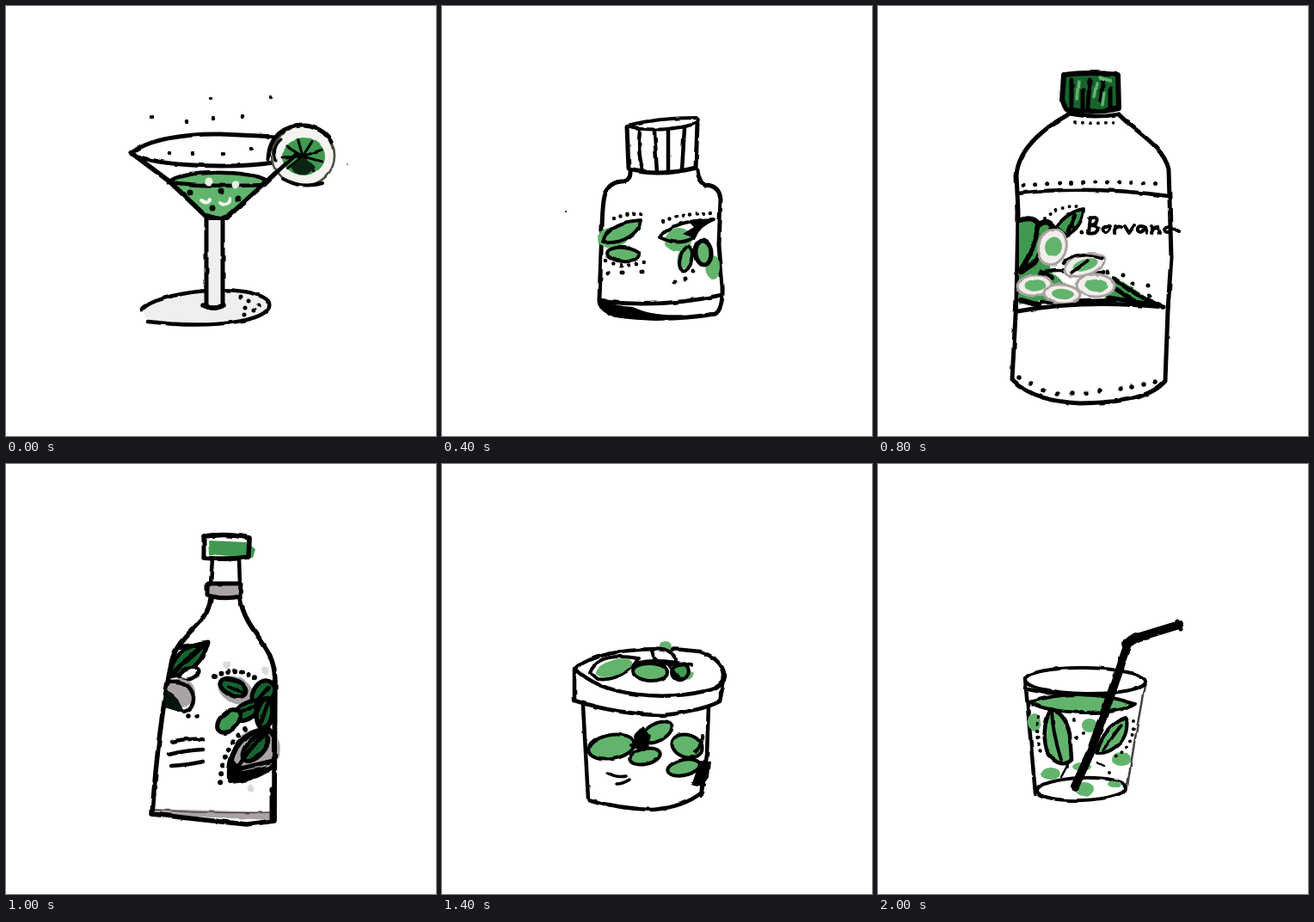
Write an HTML page that moves like this. It is 500x500 px and loops after 2.2 s.

```html
<!DOCTYPE html>
<html lang="en">
<head>
<meta charset="utf-8">
<title>Green sketches</title>
<style>
html, body { margin: 0; width: 100%; height: 100%; overflow: hidden; background: #fff; }
svg { display: block; width: 100vw; height: 100vh; }
svg > g { opacity: 0; stroke-linecap: round; stroke-linejoin: round; }
</style>
</head>
<body>
<svg id="stage" viewBox="0 0 500 500">
  <filter id="ink" filterUnits="userSpaceOnUse" x="0" y="0" width="500" height="500" color-interpolation-filters="sRGB">
    <feTurbulence type="fractalNoise" baseFrequency=".06" numOctaves="2" seed="4"/>
    <feDisplacementMap in="SourceGraphic" scale="3" xChannelSelector="R" yChannelSelector="G"/>
  </filter>
</svg>
<script>
const HOLD = 200;
const GREEN = '#62b46d', MID = '#3f9a50', DARK = '#17642f', PALE = '#efeff0', GREY = '#aaa3a5';

const line = (d, w = 4.5, fill = 'none', ink = '#000') =>
  `<path d="${d}" fill="${fill}" stroke="${ink}" stroke-width="${w}"/>`;
const wash = (d, fill = GREEN) => `<path d="${d}" fill="${fill}"/>`;
const oval = (x, y, rx, ry, turn = 0, fill = GREEN, w = 4, ink = '#000') =>
  `<ellipse rx="${rx}" ry="${ry}" transform="translate(${x} ${y}) rotate(${turn})" fill="${fill}" stroke="${ink}" stroke-width="${w}"/>`;
const blob = (x, y, rx, ry, turn = 0, fill = GREEN) => oval(x, y, rx, ry, turn, fill, 0);
const dots = (points, w = 5, ink = '#000') =>
  line(points.split(' ').map(p => `M${p}h.01`).join(''), w, 'none', ink);
const dotRow = (d, gap = 9, w = 4.5) =>
  `<path d="${d}" fill="none" stroke="#000" stroke-width="${w}" stroke-dasharray="0 ${gap}"/>`;

const limeSlice = () => {
  let spokes = '';
  for (let i = 0; i < 9; i++) {
    const a = i * Math.PI * 2 / 9 + .3;
    spokes += `M345 175l${(24 * Math.cos(a)).toFixed(1)} ${(20 * Math.sin(a)).toFixed(1)}`;
  }
  return oval(346, 174, 36, 35, 0, '#f3f3ef', 2.5, '#4c4a3c') +
    line('M305 178C306 150 325 138 348 139Q368 141 378 157', 5) +
    line('M322 201Q345 213 367 206', 4) +
    blob(346, 175, 25, 22, 0, MID) + line(spokes, 3) +
    wash('M345 175L331 188Q336 198 350 196L360 188Z', '#0a2412') +
    line('M314 180Q309 164 320 155', 3);
};

const cocktail = () =>
  line('M158 353C174 333 280 319 305 343C316 364 250 377 165 367', 4.5, PALE) +
  line('M233 246V349Q242 354 252 348V246', 5, PALE) +
  line('M229 348Q241 354 254 348', 5.5) +
  wash('M189 206C200 190 285 190 304 205L256 246H236Z') +
  line('M189 205C201 190 287 191 303 203M190 205Q240 211 301 208', 4.5) +
  line('M146 171C165 155 210 148 250 149L316 152M146 172C180 188 270 189 318 181', 5) +
  line('M146 171L190 204L234 246M335 174L301 206L257 246', 5.5) +
  wash('M226 239L236 249H258L269 237L249 245Z', '#000') +
  limeSlice() + line('M337 173L304 203', 4.5) +
  dots('169,129 210,134 238,107 240,131 275,128 307,107', 4.5) +
  dots('190,171 217,171 253,172 285,166', 4.5) +
  dots('214,217 250,215 270,224 240,235', 7) +
  dots('236,204 267,208', 9, '#e6f2e4') +
  line('M227 226q6 5 10 0M249 229q8 6 11 -5', 4, 'none', '#f4fbf3') +
  dots('273,338 282,343 294,348 278,351 288,354 277,359', 5) + dots('397,184', 1.5);

const cup = () =>
  line('M302 246C340 222 368 260 344 286C332 302 312 304 296 302', 5) +
  line('M148 228C160 204 294 204 306 228C292 252 164 252 148 228Z', 4, '#fff') +
  wash('M160 231C180 216 276 216 294 231C270 246 184 246 160 231Z') +
  line('M148 229C150 292 166 342 192 357Q226 369 260 357C288 342 304 292 306 229', 4.5) +
  oval(207, 296, 24, 12, -28) + oval(244, 301, 22, 11, 30) + oval(225, 327, 18, 9, -8, MID) +
  dotRow('M176 275Q222 259 278 275') + dots('208,194 225,178 246,191 263,172', 4.5);

const pillBottle = () =>
  line('M219 192Q220 204 207 204C187 207 187 225 186 258L183 341Q182 352 200 359Q254 368 318 358Q327 352 326 326L322 278L324 224Q322 209 307 208Q298 204 297 191', 5) +
  line('M215 140L217 190Q255 199 295 188L297 137', 5, '#fff') +
  line('M215 139Q250 130 296 130Q304 136 278 141Q240 147 215 139Z', 4, '#fff') +
  line('M230 146Q227 166 233 191M247 146L250 194M263 144V194M282 142L279 191', 4.5) +
  line('M183 343Q254 352 325 336', 4.5) +
  wash('M182 340Q200 349 222 350Q244 361 282 359L250 366L202 362Q184 355 182 340Z', '#000') +
  blob(199, 269, 19, 12, -12) + blob(215, 260, 17, 9, -20) + blob(211, 289, 18, 9) +
  blob(275, 272, 16, 14) + blob(315, 304, 9, 14) + blob(283, 292, 9, 14, 20) + blob(303, 287, 9, 12) +
  line('M187 275C192 256 212 250 231 249C229 265 211 277 187 275Z', 4) +
  oval(211, 289, 19, 8, 5, 'none') +
  line('M253 269C262 254 290 249 316 248Q298 255 293 269Q276 280 253 269Z', 4) +
  wash('M286 250L318 248L301 257L291 269L280 265L293 257Z', '#000') +
  oval(284, 294, 7, 15, 16, 'none') + oval(304, 287, 9, 14, -5, 'none', 5) +
  dotRow('M200 247Q215 241 234 242', 8) + dotRow('M257 250Q283 240 319 241', 8) +
  dotRow('M191 296Q210 306 235 298', 9) +
  dots('193,310 209,310 232,309 271,321 283,317 292,308', 5) + dots('144,239', 2);

const tub = () =>
  line('M155 261L166 390Q184 408 250 411Q315 408 334 390L346 261') +
  line('M142 226V258Q180 283 250 283Q322 281 358 258V226', 4.5, '#fff') +
  line('M142 226C162 193 338 193 358 226C338 257 162 257 142 226Z', 4, '#fff') +
  oval(220, 225, 28, 10, -12) + oval(273, 226, 24, 9, 14) +
  oval(208, 327, 29, 14, -24) + oval(252, 343, 27, 13, 26, MID) + oval(286, 318, 24, 12, -26) +
  dotRow('M181 299Q250 311 323 296') + dotRow('M184 382Q250 394 317 381');

// Handwritten label word
const script =
  line('M247 246L245 264M246 247Q257 244 254 251Q252 255 246 255Q258 255 255 261Q252 266 245 264', 4) +
  line('M267 256Q259 255 261 261Q265 266 269 259Q270 255 267 256M275 256V264M275 260Q278 255 283 257', 4) +
  line('M287 256L292 264L298 255M310 257Q301 254 302 261Q305 266 310 257L312 264', 4) +
  line('M318 256V264Q319 256 326 257L328 264M338 256Q331 257 334 262Q339 265 341 259Q341 255 338 256L350 262', 4);

const petal = (x, y, rx, ry, turn) =>
  oval(x, y, rx, ry, turn, '#f1eeec', 3, '#aaa29f') + blob(x + 1, y, rx * .62, ry * .55, turn);

const largeBottle = () =>
  line('M220 127C200 138 163 163 161 197L163 240L161 340L156 434C176 455 204 460 235 462C276 461 315 458 334 436L337 354L341 292L338 190C332 162 296 144 280 126', 5) +
  line('M216 80Q247 76 279 80L280 119Q249 126 219 120L214 110Z', 6, DARK) +
  line('M225 86V116M238 98V118M246 86L244 118M262 84L259 110M270 96V117', 5) +
  line('M233 88L231 108M254 90L251 106M263 101L261 114M258 83L270 87', 3.5, 'none', GREEN) +
  line('M221 125Q250 131 280 126', 4.5) + dotRow('M229 135Q255 138 282 134', 9, 4) +
  line('M162 218Q243 208 338 221', 4.5) + dotRow('M169 209Q240 202 335 207', 14, 5) +
  wash('M164 247Q176 244 188 255L203 252L200 308L232 337L164 347Z', MID) +
  line('M165 249Q181 244 187 254Q181 286 166 307M187 255Q195 247 203 255L185 295M167 309L184 297M190 309L202 316M166 342L187 348', 6) +
  line('M207 257Q221 239 239 236Q238 257 219 267Z', 4, MID) + line('M229 243L221 262', 5) +
  wash('M262 343L275 314Q300 331 332 350Z', MID) +
  line('M274 317Q298 336 331 350M268 339L318 347M276 329L300 344', 5) +
  line('M216 299Q241 285 261 294M188 311Q204 305 219 308M224 313L262 310M190 345L276 342', 4.5) +
  petal(203, 280, 16, 21, 14) + petal(240, 301, 24, 12, -17) + petal(253, 325, 22, 13, 2) +
  petal(182, 325, 20, 12, -5) + petal(214, 335, 21, 11, 5) +
  line('M217 296Q240 285 260 293M225 310L244 296', 3.5) +
  line('M162 355Q240 341 332 350', 5) +
  dotRow('M194 247Q216 229 236 234', 8, 4) +
  dots('228,258 237,263 267,310 285,313 296,323 314,325 315,337', 5) + script +
  dots('164,432 178,438 192,447 209,451 225,450 242,450 258,448 282,445 295,443 310,440 323,437', 5.5);

const spiritBottle = () =>
  wash('M173 401L310 405V414L171 408Z', GREY) +
  line('M173 402Q234 407 309 405', 1.5, 'none', '#4e464b') +
  line('M240 111L238 139M271 111L272 139', 4.5) +
  line('M238 157C234 187 201 197 193 228C183 275 175 336 170 407Q230 414 280 419L312 415L313 252C312 207 281 200 272 157', 5.5) +
  line('M234 139H274L273 154Q253 158 234 153Z', 5, GREY) +
  line('M230 84Q258 80 283 86L282 108Q256 112 230 109Z', 5, '#fff') +
  wash('M235 89L280 91L290 99L287 109L236 105Z', MID) + line('M230 84Q258 80 283 86L282 108Q256 112 230 109', 5.5) +
  line('M193 323Q208 319 229 320M189 338Q208 333 229 332M192 351Q212 350 229 346', 4.5) +
  line('M190 247C192 225 208 209 235 207C230 228 215 246 190 247Z', 5, DARK) +
  line('M191 246L229 211M202 213L232 209', 6) +
  oval(213, 244, 12, 6, -22, '#fff', 4.5) + blob(204, 266, 16, 17, -20, GREY) +
  line('M190 253Q213 251 218 270Q219 286 206 288L188 280M188 270L201 286', 4.5) +
  wash('M186 260L200 274L208 290L184 283Z', '#06150b') + dots('212,293 222,294', 5.5) +
  blob(267, 263, 22, 15, 28, GREY) + blob(291, 334, 29, 25, -35, GREY) +
  oval(264, 260, 16, 9, 25, DARK, 5) + oval(299, 268, 12, 17, 24, DARK, 5) +
  oval(281, 287, 18, 9, -30, DARK, 5) + oval(259, 299, 16, 10, -45, MID, 5) + oval(301, 290, 9, 17, 8, DARK, 6) +
  line('M271 290L292 280M291 276L305 260M259 259L275 265M297 300L304 279', 4.5) +
  line('M260 369C258 343 267 312 305 308L312 318V350Q289 368 260 369Z', 6) +
  oval(290, 330, 19, 10, -47, DARK, 5) + line('M264 364Q276 335 306 310M273 354L311 345', 5) +
  wash('M258 371L263 342L275 357L305 351L285 366Z', '#000') +
  dotRow('M243 247Q266 235 290 249', 8, 6) + dotRow('M278 309Q251 329 249 373', 10, 6) +
  dots('256,234 301,240 285,377', 9, '#dedada') + line('M312 252V413M309 378V414', 5);

const pumpBottle = () =>
  line('M204 182C178 193 169 210 169 236L173 398Q240 417 312 398L317 236C317 211 304 194 282 182') +
  line('M211 150H276L281 182Q244 191 205 183Z', 4.5, MID) +
  line('M236 150V128M250 150V128M204 128Q207 114 223 114H268V129H217L207 136Z', 4.5, '#fff') +
  line('M171 231Q243 243 316 231M173 366Q243 378 314 365', 3.5) +
  oval(216, 286, 31, 14, -44) + oval(263, 284, 28, 13, 42, MID) + oval(241, 325, 26, 12, -12) +
  line('M196 306L234 267M245 267L280 301', 3) +
  dotRow('M184 222Q244 232 307 222') + dotRow('M184 385Q244 396 305 384');

const jar = () =>
  line('M164 281Q167 338 170 390Q206 401 245 402Q281 399 302 382L308 338L310 281') +
  line('M154 238V275Q202 291 257 292Q302 287 323 276L329 246', 4.5, '#fff') +
  line('M155 238C179 216 246 211 300 218C333 229 339 258 306 264C263 274 189 273 155 238Z', 4.5, '#fff') +
  blob(260, 212, 7, 6) + blob(283, 245, 9, 6) +
  line('M172 242C178 226 198 221 228 226C222 239 201 253 181 250Z', 4) +
  blob(200, 237, 22, 9, -17) +
  oval(242, 242, 20, 10, 3) + oval(258, 224, 15, 8, 24, '#fff') + oval(277, 242, 10, 9, -25, MID) +
  line('M225 232Q247 225 290 234M265 236L275 250', 4) +
  oval(197, 329, 27, 14, -10) + oval(250, 312, 19, 10, -27) + oval(236, 340, 18, 9, -12) +
  oval(285, 328, 18, 13, 18) + oval(281, 353, 19, 9, -12) +
  wash('M223 315L233 305L243 317L239 330L224 331Z', '#000') +
  line('M220 327L235 332M295 335Q305 322 303 316', 4) +
  wash('M300 345L313 346L311 363L303 374L291 371Z', '#000') + line('M304 354L301 386M293 371L305 373', 4) +
  line('M193 359Q202 365 214 363M203 372Q210 372 218 367', 3.5);

const milkBottle = () =>
  line('M214 158C213 187 185 194 185 222L188 389Q246 407 310 390L314 222C313 195 283 187 282 158') +
  line('M211 124Q247 120 285 124L284 157Q248 164 212 158Z', 4.5, DARK) +
  line('M226 132V149M246 131V151M267 132V149', 3.5, 'none', GREEN) +
  line('M187 236Q248 247 313 236M188 354Q248 364 312 354', 3.5) +
  oval(226, 280, 29, 13, -38) + oval(271, 286, 26, 12, 36, MID) + oval(246, 321, 25, 12, -16) +
  dotRow('M197 225Q248 234 304 225') + dotRow('M198 378Q248 389 303 378');

const tallBottle = () =>
  line('M229 141C225 154 201 174 201 190L205 222L192 300L191 391Q245 402 298 395L305 348L313 226C316 184 282 163 272 139', 4) +
  line('M312 214L306 326L298 389M192 389V398M188 391Q245 401 309 390') +
  line('M246 98Q245 123 236 139Q252 132 271 136Q266 117 266 98', 4, '#fff') +
  line('M228 140Q250 133 272 139', 4) +
  line('M247 84L246 97Q257 102 267 97L267 84', 3, '#eee4dc') +
  wash('M236 61L271 60L273 82Q255 88 241 82Z', '#000') + line('M258 67V78', 6, 'none', '#fff') + line('M246 67L248 77', 2, 'none', '#888') +
  dotRow('M237 143Q252 143 266 142', 8, 4) +
  dots('219,193 274,194 251,210 292,210', 4.5) +
  blob(222, 247, 28, 27, -20, '#6bb975') + blob(208, 292, 15, 30, 5) + blob(213, 320, 15, 18) + blob(254, 243, 13, 9, -20) +
  line('M200 252C204 230 218 209 234 210Q247 214 240 239Q237 259 222 264Q204 268 200 252Z', 4, MID) +
  line('M203 252Q221 237 233 217M209 262L229 239M224 264L240 246L237 271', 5) +
  wash('M194 266L217 259L241 265L211 279L206 306L193 311Z', '#10351c') +
  line('M241 248Q256 239 271 224Q281 245 267 261Q256 265 251 253L270 237', 3.5) +
  wash('M243 237L257 242L273 235L257 251L244 257Z', '#000') +
  wash('M257 249L269 239Q273 252 264 261Q256 260 257 249Z', '#f7f7f3') +
  oval(239, 299, 25, 12, 12, '#f2f2ef', 4, '#ddd9db') + blob(239, 296, 17, 7, 10) +
  line('M217 287Q251 286 262 299Q261 314 244 312Q226 309 216 298', 3.5) +
  line('M215 319Q240 318 247 333L248 349Q232 347 227 337Q221 332 212 332', 3.5, '#fff') +
  line('M207 216L195 267L193 307L203 340L199 347Q209 354 218 350M204 284L197 315L208 300', 5) +
  dotRow('M198 384Q244 394 296 385', 9, 5);

const strawGlass = () =>
  line('M171 249L183 383') + line('M311 252L299 319L289 380', 2.5, 'none', '#444') +
  oval(237, 378, 52, 13, -2, '#fff') +
  blob(240, 378, 11, 8) + blob(201, 360, 11, 7) + blob(182, 300, 8, 10) + blob(283, 343, 11, 8) +
  blob(246, 304, 9, 8) + blob(237, 352, 11, 5) + blob(275, 372, 8, 4) +
  oval(241, 252, 70, 15, 1, '#fff') +
  line('M176 277Q235 258 299 279Q284 289 240 289Q196 288 176 277Z', 4, GREEN) +
  line('M175 262L195 266L268 269') +
  line('M201 285Q218 290 223 314L225 344Q213 355 198 338Q188 310 201 285Z', 4.5, GREEN) +
  line('M202 288Q203 312 213 344', 4) +
  line('M254 336Q263 304 289 295Q292 318 276 329Q267 337 254 336Z', 4, GREEN) + line('M262 332L283 304', 3.5) +
  dotRow('M187 294Q182 318 191 341', 8, 4.5) + dotRow('M297 299Q298 329 276 340', 8, 4) +
  dots('228,298 237,288 231,318 239,313 220,352 247,340 269,359', 4) +
  line('M213 364L221 349M255 347L263 351', 2.5) +
  line('M229 375L246 338L270 270L291 209L301 202L350 187', 10) +
  line('M289 209L300 202', 12) + line('M348 183L352 192', 5) + dots('229,376', 10);

const scenes = [cocktail, cup, pillBottle, tub, largeBottle, spiritBottle,
  pumpBottle, jar, milkBottle, tallBottle, strawGlass];
const loop = HOLD * scenes.length;
const stage = document.getElementById('stage');

scenes.forEach((draw, i) => {
  const group = document.createElementNS('http://www.w3.org/2000/svg', 'g');
  group.setAttribute('filter', 'url(#ink)');
  group.innerHTML = draw();
  stage.append(group);
  group.animate([
    { opacity: 1, offset: 0, easing: 'steps(1)' },
    { opacity: 0, offset: 1 / scenes.length },
    { opacity: 0, offset: 1 }
  ], { duration: loop, delay: i * HOLD - loop, iterations: Infinity });
});
</script>
</body>
</html>
```
